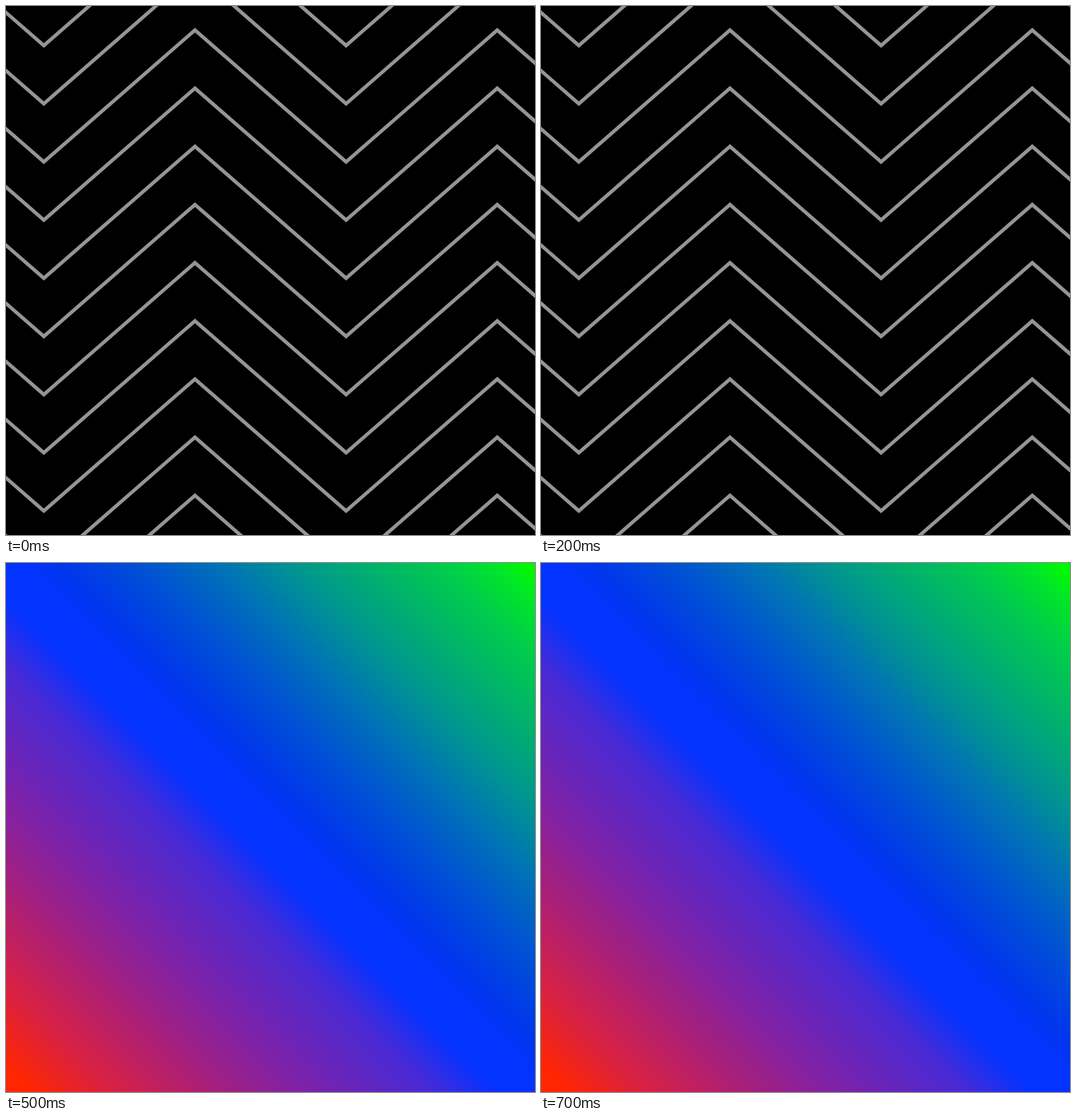
Write an HTML page without scripts that moves like this. It is 748 px wide and 748 px high and loops after 0.8 s.

```html
<!DOCTYPE html>
<html lang="en">
<head>
<meta charset="utf-8">
<title>Zigzag flash</title>
<style>
  html, body { margin: 0; width: 100%; height: 100%; overflow: hidden; background: #000; }
  svg { position: absolute; inset: 0; width: 100%; height: 100%; }
  .zigzag { fill: none; stroke: #959595; stroke-width: 5; stroke-miterlimit: 10; }
  .glow {
    position: absolute;
    inset: 0;
    background: linear-gradient(45deg,
      #ff2600 0%, #ff2600 2.5%, #d92142 10%, #a61f7c 20%, #7f22a6 28%,
      #6425bd 34%, #4a2ad4 40%, #0433ff 46.5%, #0433ff 51%,
      #0036ec 55%, #0054d2 63%, #0073b5 70%, #00968f 77%,
      #00b16c 84%, #00cc4c 91%, #00e628 96%, #00f900 99%);
    animation: flash 200ms step-end infinite;
  }
  @keyframes flash {
    0% { visibility: hidden; }
    50%, 100% { visibility: visible; }
  }
</style>
</head>
<body>
<svg viewBox="0 0 748 748">
  <defs>
    <path id="line" d="M-160.2 34 L53.5 220.4 L267.2 34 L480.9 220.4 L694.6 34 L908.3 220.4"/>
    <g id="trio">
      <use href="#line"/>
      <use href="#line" y="82.25"/>
      <use href="#line" y="164.5"/>
    </g>
  </defs>
  <g class="zigzag">
    <use href="#trio" y="-164.5"/>
    <use href="#trio" y="82.25"/>
    <use href="#trio" y="329"/>
    <use href="#trio" y="575.75"/>
  </g>
</svg>
<div class="glow"></div>
</body>
</html>
```
